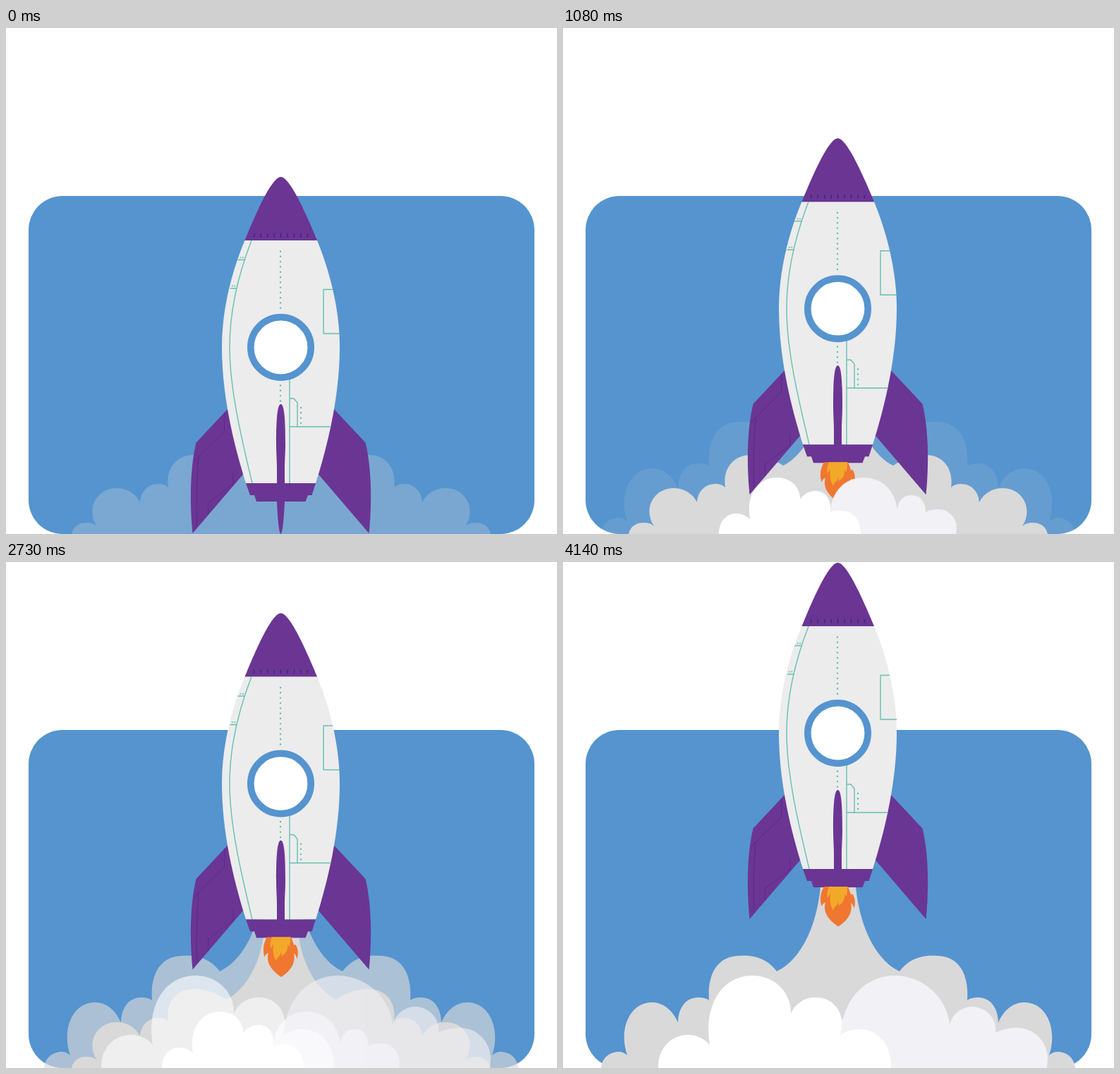
These frames come from a looping animation (781 px wide and 717 px high, 4540 ms). An HTML page:

```html
<!DOCTYPE html>
<html lang="en">
<head>
<meta charset="utf-8">
<title>Rocket launch</title>
<style>
  html, body { margin: 0; width: 100%; height: 100%; overflow: hidden; background: #fff; }
  svg { display: block; width: 781px; height: 717px; }
</style>
</head>
<body>
<svg viewBox="0 0 781 717" xmlns="http://www.w3.org/2000/svg">
  <defs>
    <path id="outerHalf" d="M54 717C55 703 66 694 79 694C84 694 88 696 91 699C78 660 96 624 126 624C143 624 156 636 163 653C163 632 174 617 192 617C198 617 203 618 207 621C204 580 222 558 250 558C278 556 293 567 303 580C335 565 359 520 365 461L366 450H392V717Z"/>
    <path id="innerHalf" d="M93 717C95 707 103 701 114 701C120 701 125 702 129 706C113 682 128 652 157 652C172 652 184 660 190 672C191 657 201 646 216 646C222 646 227 648 230 651C226 625 241 605 266 605C284 605 300 612 312 620C338 608 362 570 366 520L372 470H392V717Z"/>
    <path id="fin" d="M315 539L269.500 587.500C261 622 260 672 264.500 716L336.500 632L345 600Z"/>
    <path id="finLines" d="M309.500 545V571L266 614M273 607Q269 655 270.500 706M322 630V646L286.500 673V690"/>
  </defs>

  <rect x="32" y="238" width="717" height="479" rx="48" fill="#5594cf"/>

  <g fill="#d9d9d9">
    <g id="outer"><use href="#outerHalf"/><use href="#outerHalf" transform="matrix(-1 0 0 1 780 0)"/></g>
    <g id="inner"><use href="#innerHalf"/><use href="#innerHalf" transform="matrix(-1 0 0 1 780 0)"/></g>
  </g>

  <g id="rocket">
    <g fill="#6b3594">
      <use href="#fin"/>
      <use href="#fin" transform="matrix(-1 0 0 1 779 0)"/>
    </g>
    <g fill="none">
      <use href="#finLines" stroke="#582a86"/>
      <use href="#finLines" stroke="#583d98" transform="matrix(-1 0 0 1 779 0)"/>
    </g>
    <path fill="#ececec" d="M338.500 301C322 340 306 395 306 452C306 520 322 588 340 645H439C457 588 473 520 473 452C473 395 457 340 441 301Z"/>
    <path fill="#6b3594" d="M338.500 301C351 270 376 211 389.500 211C403 211 428 270 441 301Z"/>
    <path id="ticks" fill="none" stroke="#2f2b7c" stroke-width="1.3"/>
    <path fill="none" stroke="#66c0b0" stroke-width="1.4" d="M348 301C331 345 317 395 317 452C317 515 336 590 349 645M328.500 328.500H338M317.500 369H326.500M463 370.500H450V433H473M402 495V645M402 565H461M402 525H408L413 531V565"/>
    <g id="dots" fill="#5fbfae"></g>
    <circle cx="389.500" cy="452.500" r="42.700" fill="#fff" stroke="#5594cf" stroke-width="9.600"/>
    <g fill="#6b3594">
      <path d="M340 645H439L433.500 662H428L424.500 671H355L352 662H346Z"/>
      <path d="M389.500 533C384 533 383 560 383 590C383 602 384 612 384 625V671C385 695 387 716 389.500 717C392 716 394 695 395 671V625C395 612 396 602 396 590C396 560 395 533 389.500 533Z"/>
    </g>
    <g id="flame">
      <path fill="#f07730" d="M370 670C364 680 364 690 366.500 698Q368 694 372 692C368 706 376 717 390 726.500C404 718 411 706 408 693Q411 695 412.500 701C415 692 414 686 410 680Q409 682 408 681Q406 675 404 670Z"/>
      <path fill="#f2a929" d="M377 670C374 677 374 681 375 686L379 680Q377 695 383 704C384 698 390 697 390 690L391 697C398 692 400 687 399 680L402 684Q403 676 403 670Z"/>
    </g>
  </g>

  <g id="puff">
    <path fill="#f2f1f6" d="M379 686C380 657 400 637 426 637C452 637 472 656 474 684C474 671 482 662 494 662C506 662 514 671 514 686C519 683 525 682 531 682C547 682 558 694 558 709L557 717H379Z"/>
    <path fill="#fff" d="M221 717C221 700 231 688 245 688C254 688 260 691 265 696C259 664 275 637 303 637C324 637 337 652 336 668C341 660 349 656 358 656C372 656 381 668 379 686C386 683 392 684 396 684C411 684 422 697 422 717Z"/>
  </g>
  <g id="billow">
    <path fill="#f2f1f6" d="M393 717V671L395 658C400 618 430 586 470 586C510 586 545 618 548 656A33 33 0 0 1 613 667C622 662 634 660 643 660C668 660 687 680 687 704L686 717Z"/>
    <path fill="#fff" d="M135 717C134 691 152 670 177 670C189 670 200 675 208 684C199 630 224 586 268 586C300 586 324 610 323 640C329 625 343 617 358 617C381 617 398 635 395 660L393 671C401 664 410 662 421 662C446 662 466 684 465 717Z"/>
  </g>
</svg>
<script>
  const LOOP = 4540, FLIGHT = 4140, STEP = 30, CLIMB = 210;
  const el = id => document.getElementById(id);

  // Opacity keys: [time, value]
  const fades = {
    puff: [[0, 0], [300, 1]],
    flame: [[150, 0], [360, .62], [510, 1]],
    inner: [[540, .28], [900, 1]],
    outer: [[690, 0], [1650, .32], [2730, .65], [3510, .88], [4140, 1]],
    billow: [[1650, 0], [2730, .6], [3510, .88], [4140, 1]]
  };

  function valueAt(keys, t) {
    if (t <= keys[0][0]) return keys[0][1];
    for (let i = 1; i < keys.length; i++) {
      const [t0, v0] = keys[i - 1], [t1, v1] = keys[i];
      if (t <= t1) return v0 + (v1 - v0) * (t - t0) / (t1 - t0);
    }
    return keys[keys.length - 1][1];
  }

  const dot = (x, y, r = 1.2) => `<circle cx="${x}" cy="${y}" r="${r}"/>`;
  const column = (x, y, count, gap) =>
    Array.from({ length: count }, (_, i) => dot(x, y + i * gap)).join('');

  el('dots').innerHTML =
    column(389, 316.5, 12, 7.3) + column(389, 506.5, 4, 7.3) + column(418, 538, 4, 7.3) +
    dot(332.5, 325.3, 1) + dot(336, 325.3, 1) + dot(320.8, 365.6, 1) + dot(324.3, 365.6, 1);
  el('ticks').setAttribute('d',
    Array.from({ length: 9 }, (_, i) => `M${351.8 + i * 9.45} 291v5.500`).join(''));

  function render(ms) {
    const t = Math.min(Math.floor(ms % LOOP / STEP) * STEP, FLIGHT);
    el('rocket').setAttribute('transform', `translate(0 ${-CLIMB * t / FLIGHT})`);
    for (const id in fades) el(id).setAttribute('opacity', valueAt(fades[id], t));
  }

  let start;
  function tick(now) {
    start ??= now;
    render(now - start);
    requestAnimationFrame(tick);
  }
  render(0);
  requestAnimationFrame(tick);
</script>
</body>
</html>
```
